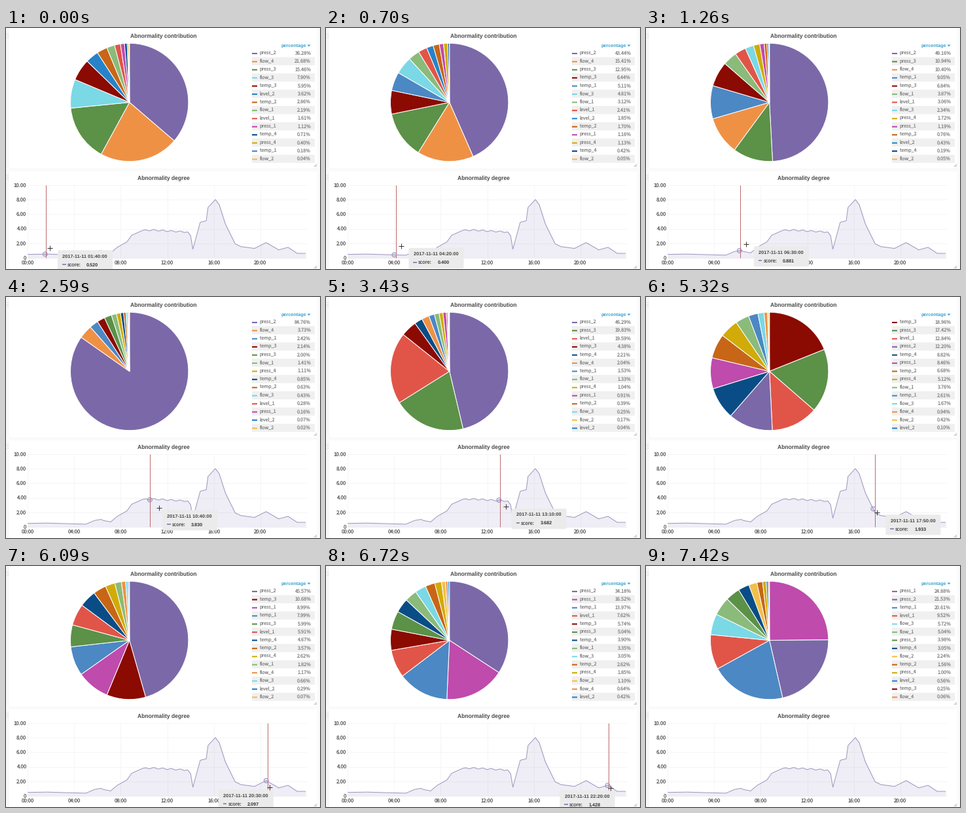
Write a matplotlib script that moves like this. It is 480 px wide and 368 px high and loops after 7.49 s.

```python
import matplotlib.pyplot as plt
import numpy as np
from matplotlib.animation import FuncAnimation
from matplotlib.patches import Circle, FancyBboxPatch, Polygon, Rectangle, Wedge

W, H, DPI = 480, 368, 100
FRAMES, INTERVAL = 107, 70
LAST_HOVER = 103
PX = 72 / DPI
plt.rcParams["text.hinting"] = "none"

KINDS = {"p": "press_", "f": "flow_", "t": "temp_", "l": "level_"}
COLORS = {
    "p1": "#bf4bad", "p2": "#7b68a8", "p3": "#5c9148", "p4": "#d1ab07",
    "f1": "#8abb7b", "f2": "#f0c04a", "f3": "#7bd8e5", "f4": "#ef9145",
    "t1": "#4c88c4", "t2": "#c76616", "t3": "#8b0a02", "t4": "#0a4d86",
    "l1": "#e15548", "l2": "#2683c9",
}
N = len(COLORS)

# At each step: the ranking and the leading shares; the tail follows a rule
RANKING = [
    (0, "p2 f4 p3 f3 t3 l2 t2 f1 l1 p1 t4 p4 t1 f2",
     (36.28, 21.68, 15.46, 7.90, 5.95)),
    (18, "p2 p3 f4 t1 t3 f1 l1 f3 p4 p1 t2 l2 t4 f2",
     (49.16, 10.94, 10.40, 9.05, 6.84)),
    (37, "p2 f4 t1 t3 p3 f1 p4 t4 t2 f3 l1 p1 l2 f2",
     (84.76, 3.73, 2.42, 2.14, 2.00)),
    (60, "l1 p3 p2 t3 t4 p1 f1 p4 t1 f4 f2 t2 f3 l2",
     (37.30, 36.17, 11.02, 6.44, 3.45)),
    (76, "t3 p3 l1 p2 t4 p1 t2 p4 f1 t1 f3 f4 f2 l2",
     (18.96, 17.42, 12.84, 12.20, 8.82)),
    (87, "p2 t3 p1 t1 p3 l1 t4 t2 p4 f1 f4 f3 l2 f2",
     (45.57, 10.68, 8.99, 7.99, 5.99)),
    (106, "p1 p2 t1 l1 f3 f1 p3 t4 f2 t2 p4 l2 t3 f4",
     (24.88, 21.53, 20.61, 9.52, 5.72)),
]
STEPS = [step for step, _, _ in RANKING]

# Turning points of the score: minute, value
TURNS = np.array([
    (0, .48), (100, .52), (300, .37), (345, .88), (378, 1.03), (390, .881),
    (428, .68), (462, 1.45), (512, 2.2), (536, 3.1), (590, 3.75),
    (640, 3.83), (826, 3.55), (840, 3.06), (852, 1.2), (890, 4.9),
    (921, 5.1), (930, 6.922), (968, 8.02), (988, 7.3), (1019, 4.7),
    (1070, 1.933), (1100, 1.55), (1170, 1.3), (1230, 2.097), (1295, 1.1),
    (1343, 1.45), (1390, .62), (1434, .62),
])

# Pointer x and y, rule x, hovered minute at each step
PATH = np.array([
    (67, 336, 61, 100), (153, 330, 143.5, 390), (234, 322, 220, 640),
    (312, 318, 309, 930), (353, 329, 350, 1070), (403, 338, 400, 1230),
    (460, 340, 457, 1430),
])
HOVER = STEPS[:-1] + [LAST_HOVER]
TIP_W, TIP_H, TIP_MAX = 84, 31, 468

LEFT, TOP, BASE = 33.2, 240, 351
MIN_W = 17.78 / 60
ROW0, ROW_H = 38.3, 12.42


def px(minute):
    return LEFT + minute * MIN_W


def py(score):
    return BASE - score * (BASE - TOP) / 10


def score_at(minute):
    plateau = (minute > 590) & (minute < 820)
    ripple = .09 * np.sin(2 * np.pi * (minute - 640) / 45)
    return np.interp(minute, *TURNS.T) + plateau * ripple


def ten(minute):
    return int(minute + 1e-6) // 10 * 10


def share_table():
    """Shares per step and sensor; the tail shrinks quadratically."""
    table = {name: [] for name in COLORS}
    for _, order, head in RANKING:
        tail = np.arange(N - len(head), 0, -1) ** 2
        tail = tail * (100 - sum(head)) / tail.sum()
        for name, share in zip(order.split(), [*head, *tail]):
            table[name].append(share)
    return table


SHARES = share_table()

fig = plt.figure(figsize=(W / DPI, H / DPI), dpi=DPI, facecolor="white")
ax = fig.add_axes([0, 0, 1, 1])
ax.set_xlim(0, W)
ax.set_ylim(H, 0)
ax.axis("off")


def text(x, y, s="", size=7.1, color="#868686", z=5, bold=False, ha="left"):
    font = "Liberation Sans" if bold else "Noto Sans CJK JP"
    return ax.text(x, y, s, fontsize=size * PX, color=color, zorder=z, ha=ha,
                   va="baseline", family=font,
                   weight="bold" if bold else "normal")


def rect(x, y, w, h, color, z=1):
    return ax.add_patch(Rectangle((x, y), w, h, fc=color, lw=0, zorder=z,
                                  snap=False))


def line(xs, ys, color, width=1.0, z=2):
    return ax.plot(xs, ys, color=color, lw=width * PX, zorder=z,
                   solid_capstyle="butt")[0]


def draw_panels():
    rect(0, 0, 5, H, "#f8f8f8")
    rect(0, 214, W, 5, "#fafafa")
    rect(475.5, 0, 5, H, "#fafafa")
    for y, title in ((12, "Abnormality contribution"),
                     (228.6, "Abnormality degree")):
        text(240.7, y + 3, title, 8.55, "#4a4a4c", bold=True, ha="center")
        for dy in (-4, -1, 2):
            for x in (1, 3):
                rect(x, y + dy, 1, 1, "#cfcfcf")
    for y in (212, 367):
        ax.add_patch(Polygon([(475, y - 5), (475, y), (470, y)], fc="#d4d4d4",
                             lw=0))


def draw_legend_frame():
    text(459, 29.4, "percentage", 7.3, "#36a2cc", bold=True, ha="right")
    ax.add_patch(Polygon([(460.5, 25.6), (465.5, 25.6), (463, 28.4)],
                         fc="#36a2cc", lw=0))
    for i in range(1, N, 2):
        rect(376, ROW0 + (i - .5) * ROW_H, 96, ROW_H, "#f0f0f0")


def draw_chart():
    for v in range(0, 11, 2):
        line([LEFT, 460], [py(v)] * 2, "#f4f4f4")
        text(31, py(v) + 2.8, f"{v}.00" if v else "0", 7.8, "#555555",
             ha="right")
    for hour in range(0, 24, 4):
        x = px(hour * 60)
        line([x, x], [TOP, BASE], "#f5f5f5")
        text(x, 361, f"{hour:02d}:00", 7.7, "#555555", ha="center")
    minutes = np.union1d(TURNS[:, 0], np.arange(0, 1435, 10))
    xs, ys = px(minutes), py(score_at(minutes))
    ax.fill_between(xs, ys, BASE, color="#7b68a8", alpha=.115, lw=0, zorder=3)
    line(xs, ys, "#9f97c1", 1.05, 4)


draw_panels()
draw_legend_frame()
draw_chart()

wedges = [ax.add_patch(Wedge((188.7, 113.5), 90.2, 0, 1, ec="white", lw=PX,
                             joinstyle="bevel", zorder=3)) for _ in range(N)]
rows = []
for i in range(N):
    y = ROW0 + i * ROW_H
    rows.append((rect(376, y - .4, 8, 2.1, "k", 4), text(388, y + 2.2),
                 text(466, y + 2.5, size=7.3, ha="right")))

rule = line([0, 0], [TOP, BASE], "#bd6a6e", 1, 6)
dot = ax.add_patch(Circle((0, 0), 3.4, fc=(.48, .41, .66, .15), ec="#9a90bd",
                          lw=PX, zorder=7))
tip = ax.add_patch(FancyBboxPatch((0, 0), TIP_W - 4, TIP_H - 4,
                                  boxstyle="round,pad=2,rounding_size=2",
                                  fc="#ebebec", lw=0, zorder=8))
tip_time = text(0, 0, size=7.4, color="#444444", z=9, bold=True)
tip_name = text(0, 0, "score:", 7.4, "#555555", 9)
tip_value = text(0, 0, size=7.3, color="#333333", z=9, bold=True)
tip_dash = line([0, 0], [0, 0], "#7b68a8", 1.5, 9)
cross = [line([0, 0], [0, 0], "#333333", 1, 10) for _ in range(2)]
hover = [rule, dot, tip, tip_time, tip_name, tip_value, tip_dash, *cross]


def update_pie(i):
    shares = {name: np.interp(i, STEPS, SHARES[name]) for name in COLORS}
    ranked = sorted(shares, key=shares.get, reverse=True)
    # The y axis points down, so growing angles run clockwise
    angle = -90
    for name, wedge, (swatch, label, value) in zip(ranked, wedges, rows):
        end = angle + 3.6 * shares[name]
        wedge.set_theta1(angle)
        wedge.set_theta2(end)
        angle = end
        wedge.set_facecolor(COLORS[name])
        swatch.set_facecolor(COLORS[name])
        label.set_text(KINDS[name[0]] + name[1])
        value.set_text(f"{shares[name]:.2f}%")


def update_hover(i):
    shown = i <= LAST_HOVER
    for artist in hover:
        artist.set_visible(shown)
    if not shown:
        return
    mx, my, rx, minute = (np.interp(i, HOVER, track) for track in PATH.T)
    rule.set_xdata([rx, rx])
    at = ten((rx - LEFT) / MIN_W)
    dot.center = px(at), py(score_at(at))

    # The tip sits beside the hovered point and flips at the right edge
    minute = ten(minute)
    x, y = px(minute) + 16.2, my + 3.3
    if x + TIP_W > TIP_MAX:
        x -= TIP_W + 5
    tip.set_x(x + 2)
    tip.set_y(y + 2)
    tip_time.set_position((x + 7.2, y + 11.2))
    tip_time.set_text(f"2017-11-11 {minute // 60:02d}:{minute % 60:02d}:00")
    tip_dash.set_data([x + 7, x + 12.5], [y + 21.7] * 2)
    tip_name.set_position((x + 14, y + 24.2))
    tip_value.set_position((x + 44, y + 24.2))
    tip_value.set_text(f"{score_at(minute):.3f}")
    cross[0].set_data([mx - 4, mx + 4], [my, my])
    cross[1].set_data([mx, mx], [my - 4, my + 4])


def update(i):
    update_pie(i)
    update_hover(i)
    return []


anim = FuncAnimation(fig, update, frames=FRAMES, interval=INTERVAL,
                     init_func=lambda: update(0), repeat=True, repeat_delay=0,
                     blit=False)
plt.show()
```
